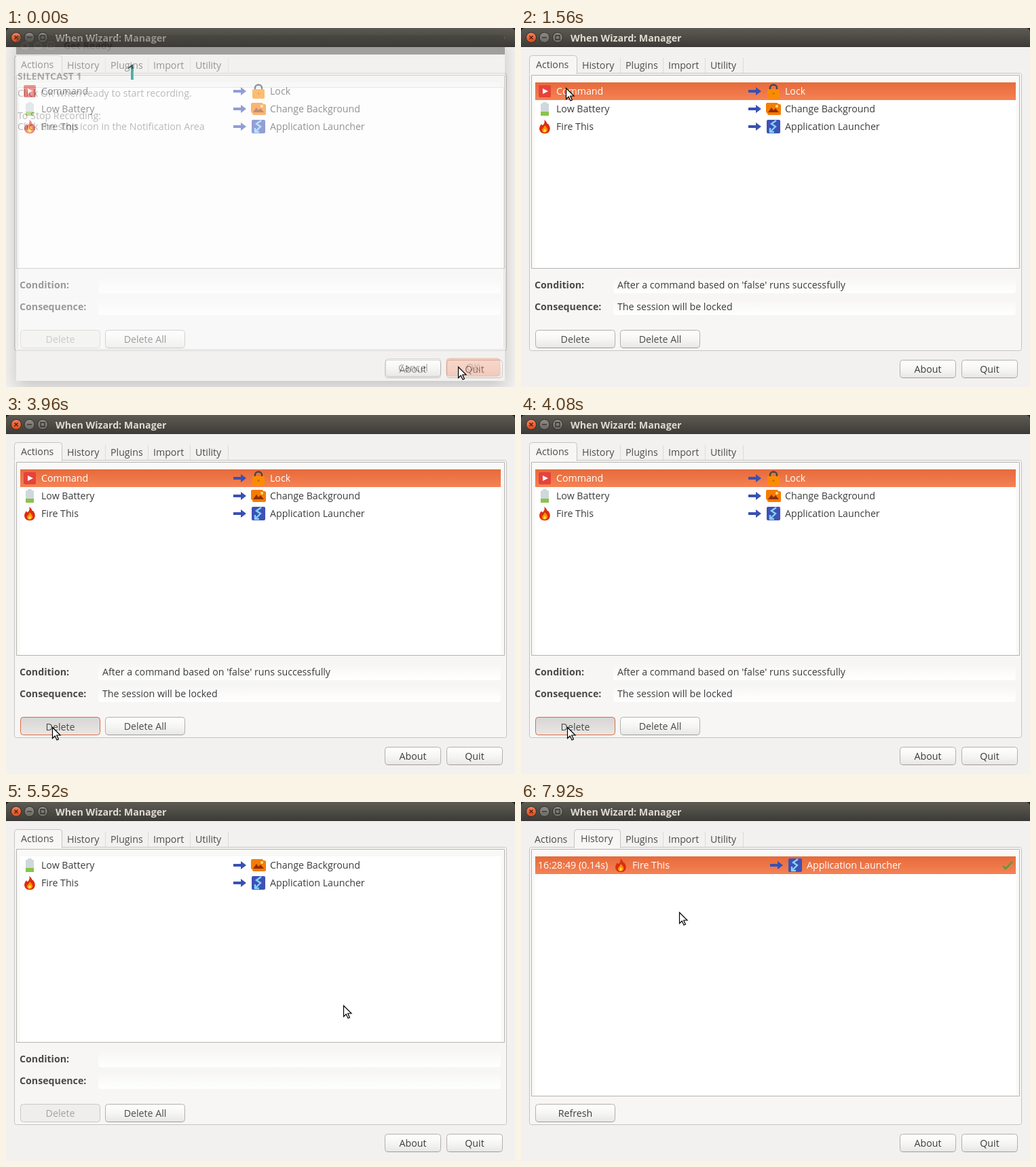
Animation of 750x528 px, one loop 8000 ms. Source, as an HTML page with a canvas:

```html
<!DOCTYPE html>
<html lang="en">
<head>
<meta charset="utf-8">
<title>When Wizard: Manager</title>
<style>
html, body { margin: 0; width: 100%; height: 100%; overflow: hidden; background: #1b1b19; }
canvas { display: block; }
</style>
</head>
<body>
<canvas id="stage" width="750" height="528"></canvas>
<script>
const W = 750, H = 528, LOOP = 8000, STEP = 120;
const FONT = '14.2px "Open Sans", "Noto Sans", sans-serif';
const INK = '#3c3c3c', BODY = '#f2f1f0', ORANGE = '#dd6a3f';
const screen = document.getElementById('stage').getContext('2d');
const buffer = document.createElement('canvas');
buffer.width = W;
buffer.height = H;
let c = screen;

// Pointer stops: time, x, y
const STOPS = [
  [0, 666, 498], [120, 640, 470], [360, 480, 350], [600, 250, 220], [840, 120, 135],
  [1080, 100, 118], [1200, 80, 100], [1320, 66, 88], [1800, 66, 88], [2040, 120, 180],
  [2400, 190, 369], [2520, 190, 369], [2640, 122, 293], [2880, 30, 195], [3000, 8, 171],
  [3120, 10, 215], [3360, 50, 384], [3600, 66, 448], [3720, 68, 459], [4200, 68, 459],
  [4440, 260, 360], [4680, 440, 281], [4920, 481, 283], [5160, 497, 299], [5760, 497, 299],
  [6240, 330, 190], [6600, 127, 75], [6720, 120, 58], [7320, 120, 58], [7560, 165, 95],
  [7920, 233, 162], [8000, 233, 162]
];

function pointerAt(t) {
  const i = STOPS.findIndex(s => s[0] > t);
  const [t0, x0, y0] = STOPS[i - 1], [t1, x1, y1] = STOPS[i];
  const k = (t - t0) / (t1 - t0);
  return [Math.round(x0 + (x1 - x0) * k), Math.round(y0 + (y1 - y0) * k)];
}

function text(s, x, midY, color = INK, bold = false, align = 'left') {
  c.font = (bold ? 'bold ' : '') + FONT;
  c.textAlign = align;
  c.fillStyle = color;
  c.fillText(s, x, midY + 5);
}

function shade(y0, y1, ...colors) {
  const g = c.createLinearGradient(0, y0, 0, y1);
  colors.forEach((col, i) => g.addColorStop(i / (colors.length - 1), col));
  return g;
}

function rect(x, y, w, h, fill) {
  c.fillStyle = fill;
  c.fillRect(x, y, w, h);
}

function box(x, y, w, h, r, fill, line, width = 1) {
  c.beginPath();
  c.roundRect(x, y, w, h, r);
  if (fill) { c.fillStyle = fill; c.fill(); }
  if (line) { c.strokeStyle = line; c.lineWidth = width; c.stroke(); }
}

function shape(d, fill, line, width = 1) {
  const p = new Path2D(d);
  if (fill) { c.fillStyle = fill; c.fill(p); }
  if (line) { c.strokeStyle = line; c.lineWidth = width; c.stroke(p); }
}

function at(x, y, draw) {
  c.save();
  c.translate(x, y);
  draw();
  c.restore();
}

// Draws a group flat, then blends it at the given opacity
function layer(alpha, draw) {
  c = buffer.getContext('2d');
  c.clearRect(0, 0, W, H);
  draw();
  c = screen;
  c.globalAlpha = alpha;
  c.drawImage(buffer, 0, 0);
  c.globalAlpha = 1;
}

function shadowBox(x, y, w, h, blur, color) {
  c.save();
  c.shadowBlur = blur;
  c.shadowOffsetY = 9;
  c.shadowColor = color;
  rect(x, y, w, h, BODY);
  c.restore();
}

const MARKS = {
  close: 'M-2.5-2.5L2.5 2.5M2.5-2.5L-2.5 2.5',
  min: 'M-3.5 0H3.5',
  max: 'M-3-3H3V3H-3Z'
};

function windowButton(kind, x, y, active) {
  at(x, y, () => {
    const hot = active && kind === 'close';
    c.beginPath();
    c.arc(0, 0, 7.5, 0, 7);
    c.fillStyle = hot ? shade(-7, 7, '#f4815c', '#dd4a1a')
      : active ? shade(-7, 7, '#8d8b84', '#6b6963') : '#53514b';
    c.fill();
    c.strokeStyle = '#2f2e2a';
    c.lineWidth = 1;
    c.stroke();
    shape(MARKS[kind], null, hot ? '#4a1c0c' : '#32312d', 1.3);
  });
}

function button(label, x, y, w, state = '', ink = INK) {
  const down = state === 'down', off = state === 'off', ring = down || state === 'focus';
  const fill = off ? '#efeeed' : down ? shade(y, y + 27, '#d6d5d4', '#e9e8e7')
    : shade(y, y + 27, '#ffffff', '#f6f6f5', '#e7e6e5');
  box(x + .5, y + .5, w - 1, 26, 4, fill, ring ? ORANGE : off ? '#c9c7c5' : '#b3b0ad');
  if (state === 'focus') box(x + 1.5, y + 1.5, w - 3, 24, 3, null, '#e58b68', 2);
  else if (!off && !down) rect(x + 4, y + 26, w - 8, 1, '#a19e9b');
  text(label, x + w / 2, y + (down ? 15 : 14), off ? '#a3a2a1' : ink, false, 'center');
}

const ICONS = {
  command() {
    box(-9, -9, 18, 18, 2, '#e5433b');
    shape('M-3-4L5 0L-3 4Z', '#fff');
  },
  battery() {
    box(-3, -10, 6, 4, 1, '#cfd8dc');
    box(-6, -8, 12, 18, 1, '#cfd8dc');
    rect(-6, 4, 12, 6, '#8bc34a');
  },
  fire() {
    shape('M-1-10C4-7 3-3 5-4C8 0 9 4 6 8C3 11-3 11-6 8C-10 3-7-1-5-4C-4-1-3-2-2-3C0-5 0-8-1-10Z', '#dd2c12');
    shape('M0-2C2 0 5 3 4 6C2 10-3 10-4 6C-5 3-1 2 0-2Z', '#ff9100');
    shape('M0 3C3 5 2 8 0 8C-3 8-2 5 0 3Z', '#ffe04a');
  },
  lock() {
    shape('M-5-2V-5A5 4.5 0 0 1 5-5V-2', null, '#454545', 2.4);
    box(-9, -3, 18, 14, 2, '#fb8c00');
    box(-1.5, 2, 3, 3, 1.5, '#d06a00');
  },
  image() {
    box(-11, -9, 18, 15, 2, '#f57c00');
    box(-9, -7, 20, 16, 2, '#f57c00');
    shape('M-8 5L-3-2L0 2L3-1L8 5Z', '#8f2e0b');
    box(3, -6, 4, 4, 2, '#ffe082');
  },
  launcher() {
    box(-10, -10, 20, 20, 2, '#3f51b5');
    shape('M4-9L-3-4L3 0L-4 7M-5 2V8H1', null, '#81d4fa', 2.4);
  },
  arrow() {
    shape('M0-2H11V-6L19 0L11 6V2H0Z', '#3a50b3');
  },
  check() {
    shape('M-7 1L-3 5L7-5', null, '#43a047', 2.4);
  }
};
const icon = (name, x, y) => at(x, y, ICONS[name]);

function titlebar(active) {
  box(0, 0, W, 28, [6, 6, 0, 0],
    active ? shade(0, 28, '#5d5b53', '#3c3b37') : shade(0, 28, '#45443f', '#3b3a36'));
  rect(0, 27, W, 1, '#32312d');
  ['close', 'min', 'max'].forEach((k, i) => windowButton(k, 15 + i * 19.5, 14, active));
  text('When Wizard: Manager', 73, 15, active ? '#dfdbd2' : '#8b8982', true);
}

const TABS = [['Actions', 20, 83], ['History', 90, 147], ['Plugins', 154, 210],
  ['Import', 217, 272], ['Utility', 279, 328]];

function notebook(page) {
  box(12.5, 66.5, 725, 408, 3, '#f7f6f5', '#c6c4c2');
  const [x0, x1] = page ? [78, 147] : [12, 83];
  TABS.forEach(([name, x, end], i) => {
    if (i !== page) {
      if (i > 0) rect(end - 1, 44, 1, 22, '#dddbd9');
      text(name, x, 55, '#4c4c4c');
    }
  });
  box(x0 + .5, 40.5, x1 - x0 - 1, 27, [4, 4, 0, 0], '#f7f6f5', '#c6c4c2');
  rect(x0 + 1, 66, x1 - x0 - 2, 3, '#f7f6f5');
  text(TABS[page][0], page ? 88 : 22, 54, '#4c4c4c');
}

function listFrame(bottom) {
  box(15.5, 69.5, 719, bottom - 70, 0, '#f9f9f8', '#b5b3b1');
  rect(21, 80, 708, bottom - 81, '#fff');
}

function selection(active) {
  rect(21, 80, 708, 26, active ? shade(80, 106, '#e66a3a', '#f58255') : shade(80, 106, '#d5d1ce', '#efedeb'));
}

const ACTIONS = [
  ['command', 'Command', 'lock', 'Lock'],
  ['battery', 'Low Battery', 'image', 'Change Background'],
  ['fire', 'Fire This', 'launcher', 'Application Launcher']
];

function actionsPage(s) {
  const ink = s.active ? '#4a4a4a' : '#626262';
  listFrame(354);
  if (s.selected) selection(s.active);
  ACTIONS.slice(s.deleted ? 1 : 0).forEach(([cause, name, effect, result], i) => {
    const y = 93 + i * 26, color = s.selected && s.active && i === 0 ? '#fff' : INK;
    icon(cause, 35, y);
    text(name, 52, y, color);
    icon('arrow', 335, y);
    icon(effect, 372, y);
    text(result, 389, y, color);
  });
  [['Condition:', "After a command based on 'false' runs successfully"],
   ['Consequence:', 'The session will be locked']].forEach(([label, value], i) => {
    const y = 378 + i * 32;
    text(label, 20, y, ink, true);
    box(136, y - 12, 593, 24, 4, shade(y - 12, y + 12, '#f7f6f5', s.active ? '#ffffff' : '#fafafa'));
    if (s.selected) text(value, 142, y, s.active ? INK : '#626262');
  });
  button('Delete', 21, 444, 118, !s.selected ? 'off' : s.pressed ? 'down' : '', ink);
  button('Delete All', 146, 444, 118, '', ink);
}

function historyPage() {
  listFrame(433);
  selection(true);
  text('16:28:49 (0.14s)', 25, 93, '#fff');
  icon('fire', 147, 93);
  text('Fire This', 164, 93, '#fff');
  icon('arrow', 367, 93);
  icon('launcher', 404, 93);
  text('Application Launcher', 421, 93, '#fff');
  icon('check', 717, 93);
  button('Refresh', 21, 444, 118);
}

function confirmDialog(yesDown) {
  shadowBox(126, 178, 442, 150, 42, 'rgba(0,0,0,.75)');
  box(126, 175, 442, 28, [6, 6, 0, 0], shade(175, 203, '#5d5b53', '#3c3b37'));
  windowButton('close', 141, 189, true);
  at(168, 239, () => {
    c.rotate(Math.PI / 4);
    box(-18, -18, 36, 36, 4, '#4a4a4a');
  });
  at(168, 239, () => {
    shape('M-6-6C-6-15 8-14 7-6C6-1 0-1 0 5', null, '#fff', 4.5);
    rect(-2.5, 8, 5, 5, '#fff');
  });
  text('Are you sure you want to delete the selected action?', 210, 224);
  button('No', 381, 288, 83, yesDown ? '' : 'focus');
  button('Yes', 472, 288, 83, yesDown ? 'down' : '');
}

function readyDialog() {
  shadowBox(15, 14, 720, 505, 24, 'rgba(0,0,0,.4)');
  box(15, 11, 720, 28, [6, 6, 0, 0], '#3f3e3a');
  ['close', 'min', 'max'].forEach((k, i) => windowButton(k, 28 + i * 19, 26, false));
  text('Get Ready', 85, 26, '#17160f', true);
  box(17.5, 87.5, 716, 385, 2, '#fcfcfc', '#d0cecc');
  text('SILENTCAST 1', 17, 71, '#555', true);
  ['Click OK when ready to start recording.', 'To Stop Recording:',
   'Click the stop icon in the Notification Area'].forEach((line, i) =>
    text(line, 17, [96, 129, 145][i], '#666'));
  button('Cancel', 559, 486, 82);
  box(649, 486, 79, 26, 4, '#f2a588', '#e58b68');
  text('OK', 688, 499, '#8a5a48', false, 'center');
}

function countdown() {
  rect(184, 57, 4, 19, '#3fb5a8');
  shape('M180 59L186 55V60', null, '#34524c', 2);
  rect(187, 64, 1, 10, '#d98b7c');
}

function draw(t) {
  const dialog = t >= 4200 && t < 5520;
  const s = {
    active: !dialog,
    selected: t >= 1440 && t < 5520,
    deleted: t >= 5520,
    pressed: t >= 3960 && t < 4200
  };
  const page = t >= 6960 ? 1 : 0;
  const ink = s.active ? INK : '#5c5c5c';
  rect(0, 0, W, H, '#1b1b19');
  rect(0, 28, W, H - 28, BODY);
  titlebar(s.active);
  notebook(page);
  if (page) historyPage(); else actionsPage(s);
  button('About', 558, 488, 83, '', ink);
  button('Quit', 649, 488, 83, '', ink);
  if (t < 240) layer(t < 120 ? .45 : .1, readyDialog);
  if (t < 120) countdown();
  if (dialog) layer(t < 4320 ? .5 : 1, () => confirmDialog(t >= 5280));
  at(...pointerAt(t), () =>
    shape('M.5 .5V16.5L4.2 13L7 19L9.4 18L6.7 12H12Z', '#fff', '#000', 1.2));
}

const start = performance.now();
function tick() {
  const t = Math.max(0, performance.now() - start) % LOOP;
  draw(Math.floor(t / STEP) * STEP);
  requestAnimationFrame(tick);
}
tick();
</script>
</body>
</html>
```
